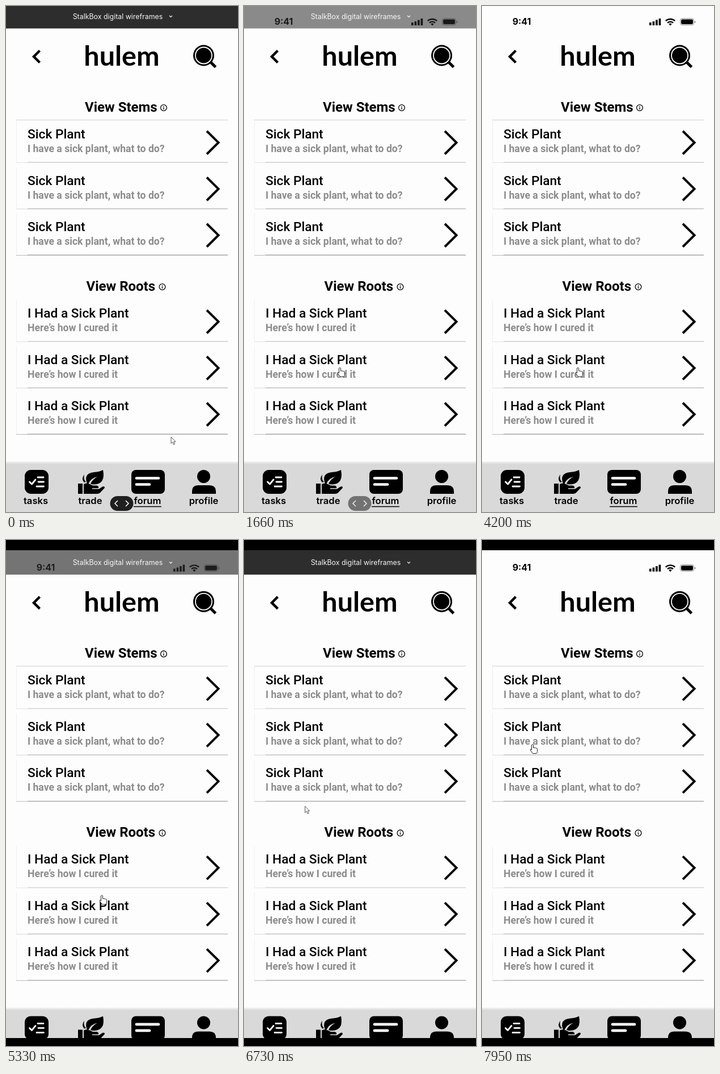
An HTML page for the animation above (8 s loop, 409 px wide and 890 px high).

```html
<!DOCTYPE html>
<html lang="en">
<head>
<meta charset="utf-8">
<title>Forum prototype</title>
<style>
  html, body { margin: 0; width: 100%; height: 100%; overflow: hidden; background: #000; }
  svg { display: block; width: 100%; height: 100%; }
  text { font-family: Roboto, "Open Sans", sans-serif; }
  .head { font-size: 24px; font-weight: 700; }
  .title { font-size: 22.7px; font-weight: 500; }
  .sub { font-size: 17.6px; font-weight: 700; fill: #8c8c8c; }
  .brand { font: 700 48.5px Lato, sans-serif; text-anchor: middle; }
  .nav { font: 600 16.6px Inter, sans-serif; text-anchor: middle; }
  .clock { font: 700 15.8px Inter, sans-serif; text-anchor: middle; }
  .bar { font: 400 12.4px Inter, sans-serif; text-anchor: middle; fill: #f4f4f4; }
  .line { fill: none; stroke: #000; }
  .white { fill: none; stroke: #fff; }
</style>
</head>
<body>
<svg viewBox="0 0 409 890">
  <defs>
    <linearGradient id="edge" x2="0" y2="1">
      <stop offset="0" stop-color="#f4f4f4"/>
      <stop offset="1" stop-color="#d9d9d9"/>
    </linearGradient>
    <g id="info">
      <circle class="line" r="5.4" stroke-width="1.3"/>
      <path class="line" d="M0-3v1.4M0-.7v3.8" stroke-width="1.3"/>
    </g>
  </defs>

  <g id="page">
    <rect y="-4" width="409" height="900" fill="#fdfdfd"/>

    <text class="clock" x="70" y="32.5">9:41</text>
    <path d="M295 29h3.6v5H295zM300.6 27h3.6v7h-3.6zM306.1 24.5h3.6v9.5h-3.6zM311.6 22h3.6v12h-3.6z"/>
    <g class="line" stroke-width="2.4">
      <path d="M323.8 26.2a12 12 0 0 1 16.4 0M327 29.6a7.2 7.2 0 0 1 10 0"/>
    </g>
    <path d="M332 34.5l-2.7-2.8a4 4 0 0 1 5.4 0z"/>
    <rect class="line" x="349.5" y="22" width="24" height="11.5" rx="3.6" stroke-opacity=".45"/>
    <rect x="351" y="23.5" width="21" height="8.5" rx="2.3"/>
    <path d="M375 26v4q1.6-.6 1.6-2t-1.6-2z" opacity=".5"/>

    <path class="line" d="M59.5 78.5L49 89L59.5 99.5" stroke-width="4.4"/>
    <text class="brand" x="204" y="105">hulem</text>
    <path class="line" d="M360 98L369.5 107.5" stroke-width="5"/>
    <circle cx="348.5" cy="87" r="18.5"/>
    <circle class="white" cx="348.5" cy="87" r="14.5" stroke-width="1.8"/>

    <text class="head" x="139" y="186">View Stems</text>
    <use href="#info" x="278" y="179"/>
    <text class="head" x="141.5" y="501">View Roots</text>
    <use href="#info" x="275.5" y="494"/>
    <path d="M18 200.5H391" stroke="#cfcfcf"/>
    <g id="rows"></g>

    <rect y="802" width="409" height="95" fill="#d9d9d9"/>
    <rect y="801" width="409" height="5" fill="url(#edge)"/>

    <rect x="33" y="816" width="42" height="42" rx="11"/>
    <g class="white" stroke-width="2.8" stroke-linecap="round" stroke-linejoin="round">
      <path d="M41.5 837l4 4 6.5-8M56 829h10M57 837h9.5M54 845h12.5"/>
    </g>

    <path d="M127 840h8v18h-8z"/>
    <path d="M137 841q5-3 11 0l5 2.500h7q4 1 3 4.500h-11v1.500h12l6-4q4-1.500 4 2l-8 8.500q-2 2-5 2h-24z"/>
    <path d="M143 840q-7-18 12-20q10-.5 16-4q5 25-16 25.500q-4 0-6-1.500q4-8 12-12q-11 2-15.500 12z"/>
    <path d="M141 837q-5-4-3-13q-6 8 0 14z"/>

    <rect x="221" y="816" width="59" height="42" rx="8"/>
    <path class="white" d="M230 830.5h39M230 841.5h23" stroke-width="4.6" stroke-linecap="round"/>

    <circle cx="348.5" cy="827.5" r="11.5"/>
    <path d="M328 858v-4q0-11 11-11h19q12 0 12 11v4z"/>

    <text class="nav" x="52.5" y="876">tasks</text>
    <text class="nav" x="148.5" y="876">trade</text>
    <text class="nav" x="249.5" y="876">forum</text>
    <text class="nav" x="348.5" y="876">profile</text>
    <path class="line" d="M225 880.5H274" stroke-width="1.6"/>

    <g id="chrome">
      <rect y="-4" width="409" height="43.5" fill="#2d2d2d"/>
      <text class="bar" x="197" y="23">StalkBox digital wireframes</text>
      <path class="white" d="M288 17l2.5 2.5 2.5-2.5" stroke-width="1.1"/>
      <rect x="183.5" y="862" width="41" height="26" rx="13" fill="#1f1f1f"/>
      <path class="white" d="M197 870l-5 5 5 5M211 870l5 5-5 5" stroke-width="1.5"/>
    </g>
  </g>

  <path id="bands" d="M0 0H409V18H0zM0 876H409V890H0z"/>

  <g id="cursor" fill="#fff" stroke-linejoin="round">
    <path id="arrow" stroke="#555" d="M0 0V11.5L2.7 9L4.6 13.5L6.6 12.6L4.700 8.300H8z"/>
    <path id="hand" stroke="#222" d="M-1.5 1q1.5-2 3 0v5q1.4-1 2.6.3q1.3-.9 2.4.4q2-.3 2 1.800v3.500q0 2.500-1.500 4h-6.500l-4-5.500q-1.200-2 .3-2.400l1.700 1.500z"/>
  </g>
</svg>

<script>
const $ = id => document.getElementById(id);
const LOOP = 8000, CUT = 5200, SHIFT = 21.4;

// Cursor hotspot: time, x, y
const path = [
  [0, 291, 758], [170, 291, 758], [450, 273, 622], [650, 273, 622],
  [780, 242, 578], [1050, 242, 578], [1390, 234, 447], [1620, 169, 636],
  [5200, 169, 636], [5610, 169, 590], [5890, 169, 590], [6030, 165, 545],
  [6240, 158, 520], [6380, 158, 520], [6900, 91, 451], [7480, 91, 451],
  [7900, 89, 359.5], [8000, 89, 359.5]
];

function row(y, title, sub, shade, inset) {
  return `<g transform="translate(0 ${y})">
    <path d="M18.5 2V75" stroke="#efefef"/>
    <path d="M18 75.5H391" stroke="${inset}"/>
    <path d="M38 75H391" stroke="${shade}" stroke-width="1.3"/>
    <text class="title" x="38" y="33">${title}</text>
    <text class="sub" x="38" y="57">${sub}</text>
    <path class="line" d="M354 20L374.500 40.200L354 60.500" stroke-width="4"/>
  </g>`;
}

const shades = [["#d2d2d2", "#e2e2e2"], ["#c4c4c4", "#d8d8d8"], ["#b0b0b0", "#b8b8b8"]];
$("rows").innerHTML = shades.map((shade, i) =>
  row(200 + i * 81.5, "Sick Plant", "I have a sick plant, what to do?", ...shade) +
  row(515 + i * 81.5, "I Had a Sick Plant", "Here’s how I cured it", ...shade)
).join("");

const clamp = v => Math.max(0, Math.min(1, v));
const ramp = (t, from, to) => clamp((t - from) / (to - from));
const ease = u => u * u * (3 - 2 * u);

function cursorAt(t) {
  const i = path.findIndex(p => p[0] > t);
  const [t0, x0, y0] = path[i - 1], [t1, x1, y1] = path[i];
  const u = ease(ramp(t, t0, t1));
  return [x0 + (x1 - x0) * u, y0 + (y1 - y0) * u];
}

function draw(t) {
  const shift = t < CUT ? 0 : SHIFT;
  $("page").setAttribute("transform", `translate(0 ${shift})`);
  $("bands").style.display = shift ? "" : "none";
  $("chrome").setAttribute("opacity", t < CUT
    ? 1 - ramp(t, 1580, 1760)
    : ramp(t, CUT, 5400) - ramp(t, 6800, 7000));

  const [x, y] = cursorAt(t), py = y - shift;
  const overRow = (py > 200 && py < 439) || (py > 515 && py < 754);
  $("cursor").setAttribute("transform", `translate(${x} ${y})`);
  $("hand").style.display = overRow ? "" : "none";
  $("arrow").style.display = overRow ? "none" : "";
}

const start = performance.now();
function tick() {
  draw((performance.now() - start) % LOOP);
  requestAnimationFrame(tick);
}
tick();
</script>
</body>
</html>
```
